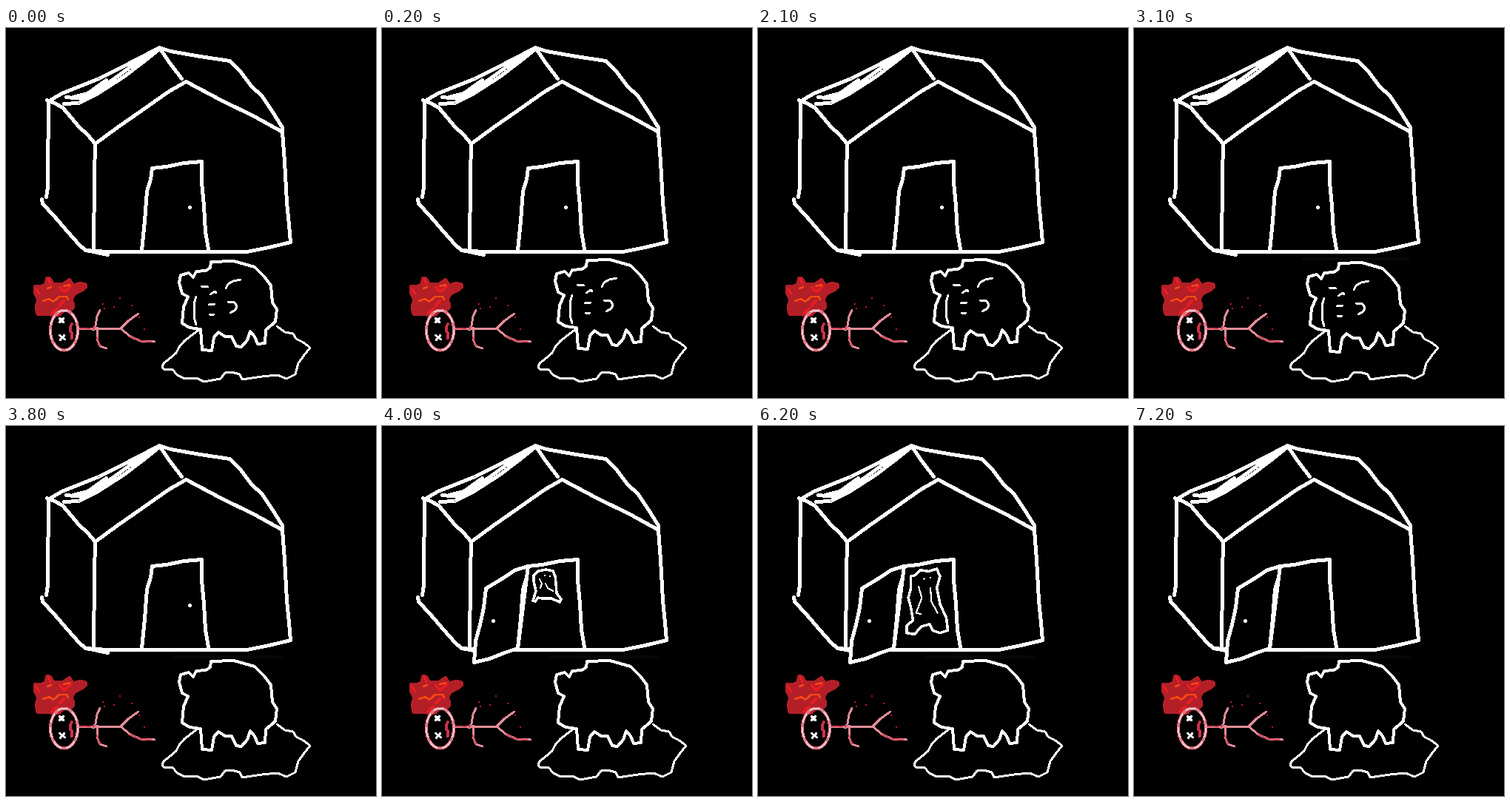
An HTML page for the animation above (8000 ms loop, 500 by 500 pixels).

```html
<!DOCTYPE html>
<html>
<head>
<meta charset="utf-8">
<style>
html, body { margin: 0; width: 100%; height: 100%; overflow: hidden; background: #000; }
svg { display: block; width: 100vw; height: 100vh; }
path, ellipse { fill: none; stroke: #fff; stroke-linejoin: round; stroke-linecap: round; }
path { vector-effect: non-scaling-stroke; }
.house path { stroke-width: 5; }
.pig path { stroke-width: 4; }
.small path { stroke-width: 3.5; }
.small .mug { stroke-width: 2.2; }
</style>
</head>
<body>
<svg viewBox="0 0 500 500" shape-rendering="crispEdges">
  <path id="smear" d="M228 312H371" style="stroke:#08080c;stroke-width:4"/>

  <g class="house" transform="translate(.5 .5)">
    <path d="M57 98 57 130 56 170 56 215 54 228M48 231 49 237 64 253 83 275 98 292 107 300 118 302 137 306M107 300 137 302H325L355 296 384 289 382 265 379 235 376 180 373 140"/>
    <path d="M120 156 119 200 118 302M55 97 65 101 76 107 88 121 98 133 110 144 120 156 150 134 183 111 220 85 243 72 290 97 335 119 373 140"/>
    <path d="M58 98 75 88 100 78 125 68 155 53 180 40 207 26 222 31 262 38 302 44 316 58 331 78 346 92 358 110 373 134V140M207 26 221 47 237 68"/>
    <path d="M81 93 104 95 122 85 147 67 172 49 207 28M78 102 98 101 122 89 158 66 187 44 207 28M90 93 110 88 135 70"/>
    <g id="open">
      <path d="M197 189 180 194 160 207 140 219 137 245 132 268 126 290 124 319 145 314 165 306 183 300Z" style="fill:#000"/>
      <path d="M150 263h.1"/>
    </g>
    <path d="M183 300 185 280 187 260 190 220 195 204 197 189 216 187 240 182 264 180 264 208 267 240 269 275 273 298"/>
    <path id="shut" d="M248 242h.1"/>
  </g>

  <path d="M38 349 48 348 53 346 55 337 60 338 64 345 76 346 86 339 91 347 100 344 108 346 109 350 103 355 93 360 89 367 92 373 91 379 86 382 79 381 72 388 60 388 42 387 40 377 43 367 38 358Z" style="fill:#b41f27;stroke:#b41f27;stroke-width:3"/>
  <path d="M40 352 45 359M57 339 60 346M72 350 79 357 88 348M79 368 72 375M62 386 70 379M64 382 70 387" style="stroke:#ed1c24;stroke-width:3"/>
  <path d="M50 369 58 366 64 370 72 363 82 363 84 367M56 352 61 350M78 349 86 347" style="stroke:#ff4a12;stroke-width:2.500"/>

  <g style="stroke-width:4">
    <ellipse cx="78.500" cy="408.500" rx="18.500" ry="27" style="stroke:#dc7584"/>
    <ellipse cx="78.500" cy="408.500" rx="18.500" ry="27" style="stroke:#f3c9cf;stroke-width:2" stroke-dasharray="12 8"/>
    <path d="M97 406.500H157M127 381 123 390 121 402 117 408 124 405 123 420 127 430 136 433M155 406 165 396 179 386M155 406 168 417 182 423 201 424" style="stroke:#e28d99;stroke-width:3"/>
    <path d="M100 406H114M120 404 118 407M123 418 127 429M168 417 182 423 196 424" style="stroke:#d9475a;stroke-width:2"/>
    <path d="M72 392 78 398M78 392 72 398M72 415 80 421M79 415 73 422" style="stroke-width:3"/>
    <path d="M89 400 87 404V410L89 412V419" style="stroke:#c93248"/>
    <path d="M131 373h.1M133 379h.1M154 365h.1M146 377h.1M170 375h.1M180 391h.1M187 407h.1M111 406h.1" style="stroke:#c01822;stroke-width:3"/>
  </g>

  <path d="M262 407 250 416 241 423 234 431 230 439 222 446 213 453 211 458 214 462 225 461 231 469 242 474 258 473 267 478 290 474 296 466 305 465 316 468 319 475 332 473 346 471 367 469 379 474 391 468 395 453 403 442 411 432 402 425 392 420 388 413 377 411 366 403" style="stroke-width:3"/>

  <g id="pig" class="pig">
    <path d="M277 318 308 317 322 321 336 325 349 338 358 350 360 373 366 382 364 399 351 410 350 428 340 429 336 419 330 412 326 424 318 433 311 432 305 419 296 419 287 413 281 420 278 438 265 437 263 409 248 407 238 401 240 379 246 365 238 361 234 346 236 336 247 333 253 339 257 331 270 330 276 326Z" style="fill:#000"/>
    <path id="face" style="stroke-width:3" d="M257 365 254 375 254 392 257 403M264 351 273 352M276 362 282 358 284 360M297 354 300 348 307 344 317 342M300 372 309 373 312 378 310 383 303 387M274 376 282 375M275 389 281 389"/>
  </g>

  <g class="small">
    <g id="far">
      <path d="M205 202 211 196 222 194 231 196 234 203 235 212 236 226 242 234 240 238 229 233 216 233 211 232 207 237 204 236 208 223 205 210Z"/>
      <path class="mug" d="M213 207 216 213 214 219M220 202h.1M227 203h.1M221 213 224 219 231 223"/>
    </g>
    <g id="near">
      <path d="M208 199 214 198 220 194 231 195 241 193 245 199 241 208 245 221 253 232 255 242 245 244 236 242 232 237 221 239 213 245 203 244 203 238 211 234 208 223 205 216 208 209Z"/>
      <path class="mug" d="M218 207 222 216 215 228 221 229M225 201h.1M233 200h.1M233 208 234 219 242 228"/>
    </g>
  </g>
</svg>
<script>
const $ = id => document.getElementById(id);
const show = (id, on) => $(id).style.display = on ? '' : 'none';
const BREATH = 1900, start = performance.now();

function draw(now) {
  const t = Math.max(0, now - start) % 8000;
  const beat = t % BREATH;
  const asleep = t < 3800;
  const lift = !asleep || beat >= 1200 ? 0 : beat < 200 ? -2 : -4;
  const opened = t >= 3900;

  $('pig').setAttribute('transform', `translate(0 ${lift})`);
  show('smear', lift === 0);
  show('face', asleep);
  show('open', opened);
  show('shut', !opened);
  show('far', t >= 4000 && t < 5100);
  show('near', t >= 5100 && t < 7200);
  // the visitor fills the doorway on its last step
  $('near').setAttribute('transform', t < 6200 ? '' : 'translate(201 193) scale(1.07 1.7) translate(-203 -193)');
  requestAnimationFrame(draw);
}
requestAnimationFrame(draw);
</script>
</body>
</html>
```
